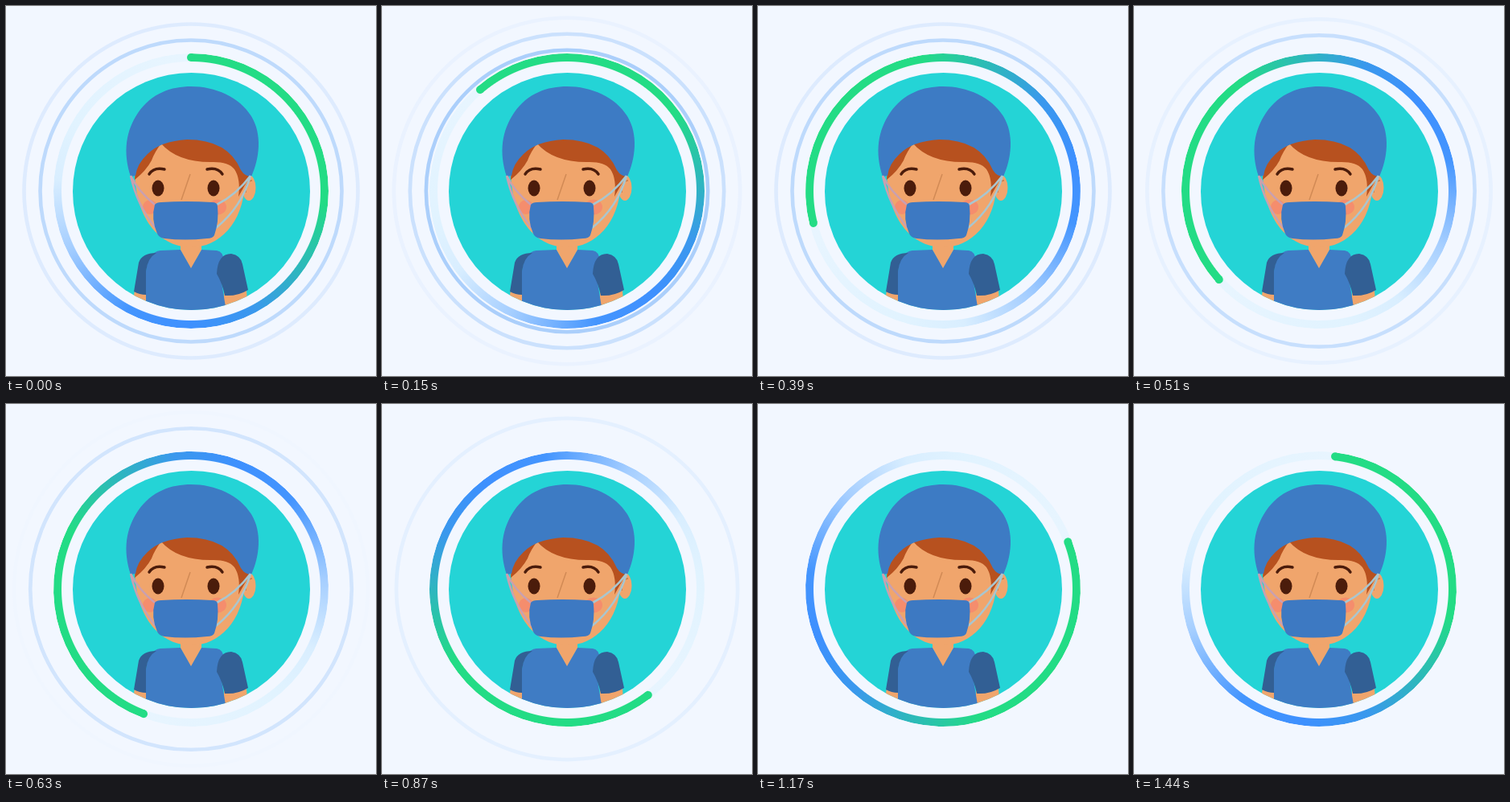
These frames come from a looping animation (460x460 px, 1.47 s). An HTML page:

```html
<!DOCTYPE html>
<html lang="en">
<head>
<meta charset="utf-8">
<title>Surgeon avatar with progress ring</title>
<style>
  html, body { margin: 0; width: 100%; height: 100%; overflow: hidden; background: #f2f7ff; }
  svg, #ring { position: absolute; left: 0; top: 0; width: 460px; height: 460px; }
  #ring { left: 59px; top: 59px; width: 342px; height: 342px; }
  #sweep {
    position: absolute; inset: 0; border-radius: 50%;
    background: conic-gradient(#23dc85 0 95deg, #2db7bd 126deg, #3a98ed 152deg, #3e90fe 180deg,
      #4495fe 208deg, #a5ceff 245deg, #d9eeff 275deg, #e1f3ff 300deg, #e8f5ff 360deg);
    mask: radial-gradient(circle closest-side, transparent 160.5px, #000 161.5px);
  }
  #cap { position: absolute; left: 166px; top: 0; width: 10px; height: 10px; border-radius: 50%; background: #23dc85; }
</style>
</head>
<body>
<svg viewBox="0 0 460 460">
  <g id="ripples" fill="none" stroke="#a0c9fb" stroke-width="4.6"></g>
</svg>
<div id="ring"><div id="sweep"></div><div id="cap"></div></div>
<svg viewBox="0 0 460 460">
  <clipPath id="disc"><circle cx="230.5" cy="230.5" r="147.5"/></clipPath>
  <g clip-path="url(#disc)">
    <path fill="#24d4d6" d="M80 80h300v300H80z"/>
    <!-- arms, neck and scrubs -->
    <path fill="#f0a56c" d="M160 354L175 357 174 380H155zM271 356L299 354 301 380H271z"/>
    <path fill="#3f7cc4" d="M174 380V330Q176 306 192 304L217 303 230 325 243 303 262 304Q272 306 270 320L267 338 274 380z"/>
    <path fill="#f0a56c" d="M217 285H243V303L230 326 217 303z"/>
    <path fill="#325f94" d="M159 355L165 319Q169 307 187 307Q176 313 174 330V359Q166 359 159 355z
      M262 333Q263 308 280 308Q292 310 294 321L301 353Q288 361 272 360Q269 345 262 333z"/>
    <!-- head -->
    <ellipse cx="302" cy="226" rx="8.5" ry="16" fill="#f0a56c"/>
    <path fill="none" stroke="#c77b48" stroke-width="1.5" d="M298 232Q298 217 306 217"/>
    <path fill="#f0a56c" d="M160 205Q163 175 195 168H265Q297 185 297 220C295 270 265 300 230 300C195 300 161 270 160 205z"/>
    <path fill="#b7511f" d="M160 216Q160 180 193 171Q185 181 181 192Q174 205 160 216z
      M192 170Q230 155 270 170Q300 190 303 212L289 237Q292 215 284 203Q277 194 258 194Q213 195 192 170z"/>
    <path fill="#3d7bc4" d="M155 212C145 182 149 155 164 133C181 108 206 100 230 100C260 100 290 113 305 137C319 160 315 190 305 212
      Q297 212 292 204Q276 166 225 166Q192 168 176 184Q163 196 161 211z"/>
    <!-- face -->
    <circle cx="179" cy="250" r="9" fill="#f58d6d"/>
    <ellipse cx="263" cy="250" rx="11" ry="9.5" fill="#f58d6d"/>
    <g fill="#4b1c0b">
      <ellipse cx="189" cy="226.5" rx="7.5" ry="10"/>
      <ellipse cx="258" cy="226.5" rx="7.5" ry="10"/>
    </g>
    <path fill="none" stroke="#4b1c0b" stroke-width="3.4" stroke-linecap="round"
      d="M178 209Q184 200 197 203M250 203Q263 200 269 209"/>
    <path fill="none" stroke="#d18a55" stroke-width="1.5" d="M229 209L218 241"/>
    <!-- mask -->
    <g fill="none" stroke-width="2.6">
      <path stroke="#c9a0b0" d="M155 211Q164 230 185 247M155 211Q163 248 186 276"/>
      <path stroke="#a9c6cf" d="M304 211Q286 235 262 247M304 211Q293 250 261 276"/>
    </g>
    <path fill="#3d79c2" d="M185 247Q187 244 193 244Q224 242 256 244Q263 244 263 249Q265 268 259 285Q257 289 250 289
      Q222 292 197 289Q190 288 188 283Q180 264 185 247z"/>
  </g>
</svg>
<script>
const LOOP = 1470, STEP = 30;
const ring = document.getElementById('ring');
const group = document.getElementById('ripples');
// Time and counter-clockwise turn in degrees.
const turns = [[0, 0], [150, 40.6], [390, 103.9], [630, 159.2], [870, 217.4], [1170, 290.7], [1470, 360]];

const ripples = [0, 1, 2].map(() => {
  const circle = document.createElementNS('http://www.w3.org/2000/svg', 'circle');
  circle.setAttribute('cx', 230);
  circle.setAttribute('cy', 230);
  return group.appendChild(circle);
});

function turnAt(t) {
  const i = turns.findIndex(([end]) => end > t);
  const [t0, a0] = turns[i - 1], [t1, a1] = turns[i];
  return a0 + (a1 - a0) * (t - t0) / (t1 - t0);
}

function draw(now) {
  const t = Math.floor(now % LOOP / STEP) * STEP;
  ring.style.transform = `rotate(${-turnAt(t)}deg)`;
  ripples.forEach((circle, i) => {
    const radius = 167.5 + 20 * (i + t / 390);
    circle.setAttribute('r', radius);
    circle.setAttribute('opacity', Math.max(0, Math.min(1, (221 - radius) / 53)));
  });
}

const start = performance.now();
function tick() {
  draw(performance.now() - start);
  requestAnimationFrame(tick);
}
tick();
</script>
</body>
</html>
```
